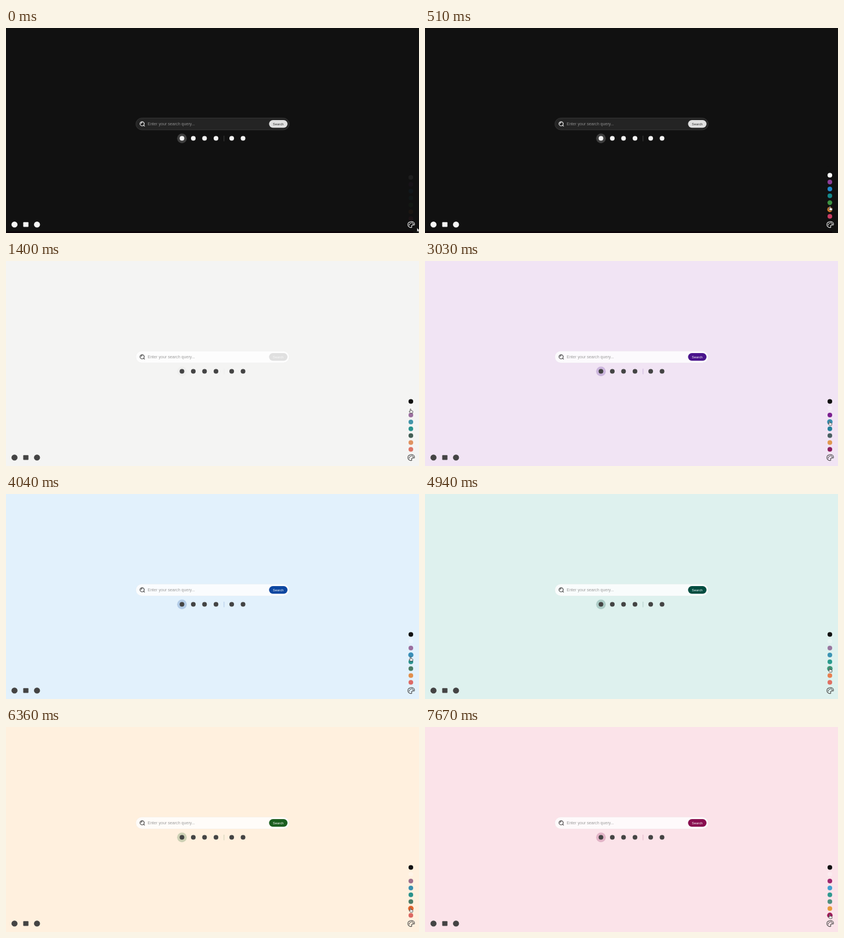
An HTML page that plays this animation: 710x354 px, repeating every 8740 ms.

```html
<!DOCTYPE html>
<html lang="en">
<head>
<meta charset="utf-8">
<title>Search start page</title>
<style>
  html, body { margin: 0; width: 100%; height: 100%; overflow: hidden; }
  svg { display: block; width: 100vw; height: 100vh; background: var(--bg); }
  text { font-family: "Liberation Sans", Arial, sans-serif; }
  .bar { fill: var(--bar); stroke: var(--edge); }
  .hint { fill: var(--hint); font-size: 7.13px; }
  .button, .tint { fill: var(--accent); }
  .tint { opacity: .22; }
  .label { fill: var(--label); font-size: 5.85px; text-anchor: middle; }
  .icon { fill: var(--ink); }
  .line { fill: none; stroke: var(--ink); stroke-linecap: round; stroke-linejoin: round; }
  #cursor path { fill: #fff; stroke: #222; stroke-width: .7; stroke-linejoin: round; }
</style>
</head>
<body>
<svg viewBox="0 0 710 354" xmlns="http://www.w3.org/2000/svg">
  <rect id="strip" y="351" width="700" height="3" fill="#0c050a"/>

  <rect class="bar" x="223.3" y="155.5" width="263.6" height="20.4" rx="10.2" stroke-width=".8"/>
  <circle class="line" cx="234" cy="165.4" r="3.6" stroke-width="1.2"/>
  <path class="line" d="M236.7 168.1l1.4 1.4M232.3 164.9a2 2 0 0 1 1.5-1.5" stroke-width="1.1"/>
  <text class="hint" x="243.4" y="168.1">Enter your search query...</text>
  <rect class="button" x="452.2" y="159" width="31.8" height="13.2" rx="6.6"/>
  <text class="label" x="468.1" y="167.5">Search</text>

  <circle class="tint" cx="302.5" cy="190.6" r="8.3"/>
  <rect class="tint" x="374.3" y="186" width="1" height="9.5"/>
  <g id="engines" class="icon"></g>

  <g class="icon">
    <circle cx="14.6" cy="339.4" r="5.2"/>
    <rect x="29.6" y="335.2" width="9" height="8.4" rx="1"/>
    <circle cx="53.3" cy="339.4" r="5.2"/>
  </g>

  <g id="dots"></g>

  <g transform="translate(696.6 339.4)">
    <path class="line" stroke-width="1.1" d="M0-5.2C-3.4-5.2-5.7-2.9-5.7 0S-3.2 5.2-.2 5.2C1.4 5.2 1.2 4 .8 3.1.2 1.7 1.2.9 2.6.9H4.2C5.2.9 5.7.3 5.7-.5 5.7-3.2 3.2-5.2 0-5.2Z"/>
    <g class="icon">
      <circle cx="-3.1" cy=".3" r="1"/><circle cx="-1.7" cy="-2.5" r="1"/>
      <circle cx="1.3" cy="-2.8" r="1"/><circle cx="3.4" cy="-1" r=".9"/>
    </g>
  </g>

  <g id="cursor">
    <path id="arrow" d="M0 0V7L1.7 5.6 2.8 8.2 4 7.7 2.9 5.2H5Z"/>
    <path id="hand" d="M-.8.7C-.8-.2.6-.2.6.7V3.1L3.2 3.6Q4 3.8 3.9 4.7L3.4 7.4H-.5L-2.3 5.1C-2.9 4.2-2 3.7-1.4 4.3L-.8 4.8Z"/>
  </g>
</svg>

<script>
const LOOP = 8740, FADE = 240, DOT_TOP = 242.4, DOT_GAP = 11.84;
const SVG_NS = 'http://www.w3.org/2000/svg';
const $ = id => document.getElementById(id);

// Dot colours run from purple to pink.
const SOFT = '#9b6f9f #3a8fb8 #2a938f #4a7d66 #e28f4c #dd6a66';
const themes = [
  { at: 0,    bg: '#111111', accent: '#e0e0e0', dots: '#8d3d98 #2187ca #14878a #3d9343 #d17b2c #cb3d63' },
  { at: 1400, bg: '#f4f4f3', accent: '#212121', dots: '#9b6f9f #4295aa #2a938f #435f55 #e09260 #dd7566' },
  { at: 2470, bg: '#f1e4f4', accent: '#4a148c', dots: '#7d2090 #3a8fb0 #247f9a #4a6062 #e0984f #8a1f60' },
  { at: 3450, bg: '#e2f1fc', accent: '#0d47a1', dots: SOFT },
  { at: 4490, bg: '#def1ee', accent: '#004d40', dots: '#9878a0 #3c94b4 #2a9c8e #3f9878 #e88050 #e07062' },
  { at: 5450, bg: '#e7f4e8', accent: '#1b5e20', dots: SOFT },
  { at: 6360, bg: '#fff0de', accent: '#e65100', dots: '#a0708c #3890ae #2a928c #4a7c68 #e0642e #dc6862' },
  { at: 7430, bg: '#fbe3e9', accent: '#880e4f', dots: '#a0286f #42a0d0 #2f9a90 #4f9080 #e89a3c #a01a5a' }
];

// Cursor tip: time, x, y
const path = [
  [0, 706.5, 345], [300, 698, 336], [600, 696, 300], [910, 695.6, 258], [1210, 695.6, 258],
  [1400, 695.6, 255.3], [1810, 695.6, 255.3], [1930, 695.6, 266], [2750, 695.6, 266],
  [3030, 695.6, 276.5], [3900, 695.6, 276.5], [4230, 695.6, 288.5], [4750, 695.6, 288.5],
  [4940, 696, 300.3], [5750, 696, 300.3], [6060, 695.6, 312.5], [6650, 695.6, 312.5],
  [6970, 696, 323.5], [LOOP, 696, 323.5]
];

function add(parent, attrs) {
  const circle = document.createElementNS(SVG_NS, 'circle');
  for (const key in attrs) circle.setAttribute(key, attrs[key]);
  return parent.appendChild(circle);
}
for (const cx of [302.5, 322, 341.3, 361, 388, 407.5]) add($('engines'), { cx, cy: 190.6, r: 4 });
const dots = Array.from({ length: 8 }, (_, i) => add($('dots'), { cx: 696, cy: DOT_TOP + i * DOT_GAP, r: 4 }));

const clamp = v => Math.max(0, Math.min(1, v));
const smooth = v => v * v * (3 - 2 * v);
const mix = (a, b, p) => a + (b - a) * p;
const channels = hex => [1, 3, 5].map(i => parseInt(hex.slice(i, i + 2), 16));
const mixColor = (a, b, p) => {
  const end = channels(b);
  return `rgb(${channels(a).map((v, i) => Math.round(mix(v, end[i], p)))})`;
};

function cursorAt(t) {
  const next = path.findIndex(key => key[0] > t);
  const [t0, x0, y0] = path[next - 1], [t1, x1, y1] = path[next];
  const p = smooth((t - t0) / (t1 - t0));
  return [mix(x0, x1, p), mix(y0, y1, p)];
}

function draw(t) {
  const index = themes.findLastIndex(theme => theme.at <= t);
  const theme = themes[index], before = themes[Math.max(0, index - 1)];
  const dark = index === 0;
  const vars = {
    bg: theme.bg,
    accent: mixColor(before.accent, theme.accent, smooth(clamp((t - theme.at) / FADE))),
    bar: dark ? '#242424' : 'rgba(255,255,255,.82)',
    edge: dark ? '#3c3c3c' : 'rgba(0,0,0,.035)',
    hint: dark ? '#8c8c8c' : '#9c9c9c',
    label: dark ? '#303030' : '#f8f8f8',
    ink: dark ? '#f4f4f4' : '#444444'
  };
  for (const name in vars) document.documentElement.style.setProperty('--' + name, vars[name]);
  $('strip').style.display = dark ? '' : 'none';

  const [x, y] = cursorAt(t);
  const shown = mix(.05, 1, smooth(clamp((t - 20) / 300)));
  const fills = ['#111111', '#ffffff', ...theme.dots.split(' ')];
  $('dots').setAttribute('opacity', shown);
  $('dots').setAttribute('transform', `translate(0 ${4 * (1 - shown)})`);
  dots.forEach((dot, i) => {
    const near = clamp(1.6 - Math.abs(y + 1 - DOT_TOP - i * DOT_GAP) / 5);
    dot.setAttribute('fill', fills[i]);
    dot.setAttribute('fill-opacity', i === 1 && !dark ? .3 : 1);
    dot.setAttribute('r', i > 1 ? 4 + .7 * near : 4);
  });

  $('cursor').setAttribute('transform', `translate(${x} ${y})`);
  $('arrow').style.display = t < 120 ? '' : 'none';
  $('hand').style.display = t < 120 ? 'none' : '';
}

const start = performance.now();
function tick() {
  draw((performance.now() - start) % LOOP);
  requestAnimationFrame(tick);
}
tick();
</script>
</body>
</html>
```
